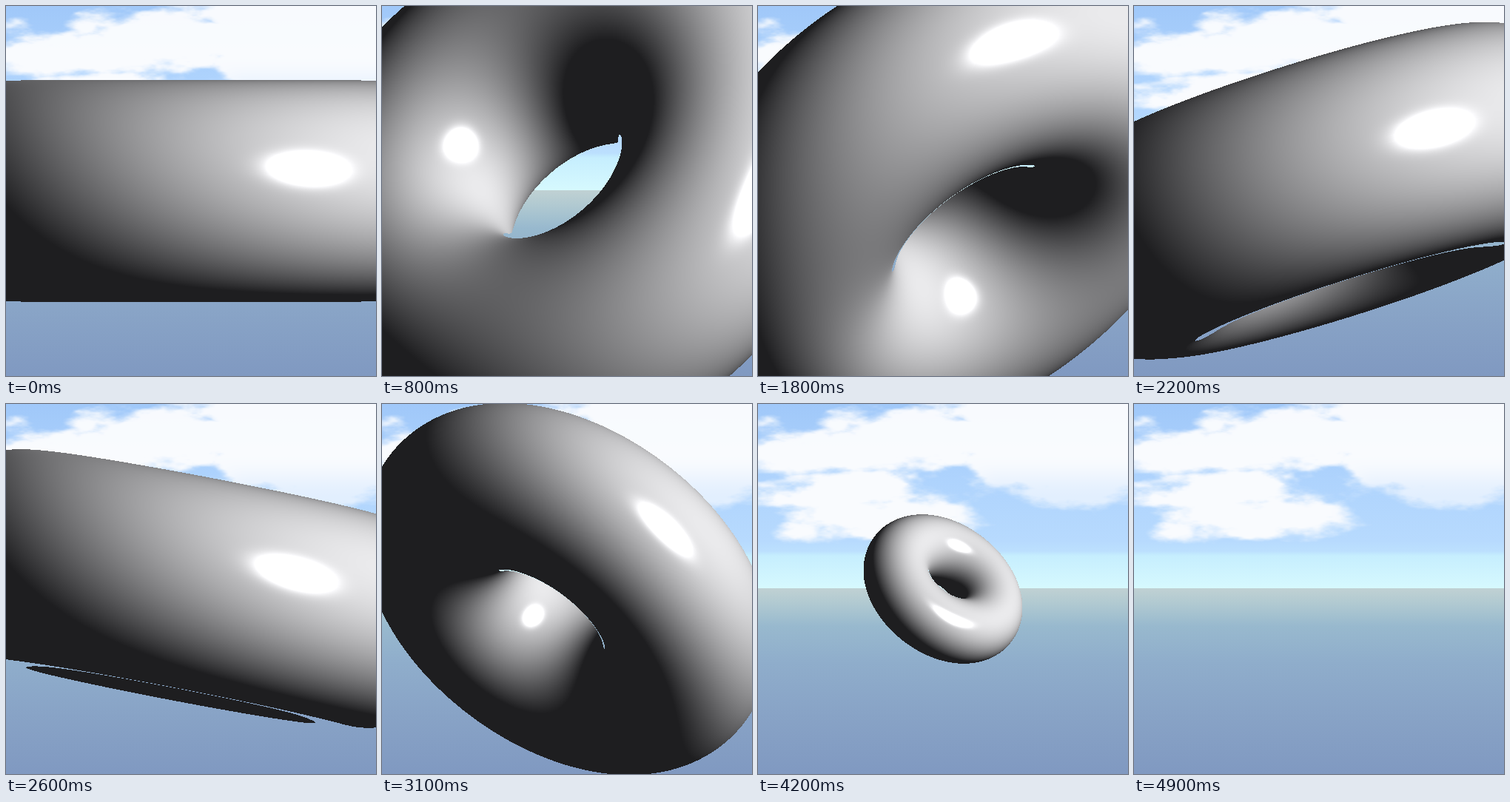
Write an HTML page with a canvas that moves like this. It is 500x500 px and loops after 5000 ms.

```html
<!DOCTYPE html>
<html lang="en">
<head>
<meta charset="utf-8">
<title>Tumbling torus</title>
<style>
  html, body { margin: 0; width: 100%; height: 100%; overflow: hidden; background: #8aa5c6; }
  canvas { display: block; width: 100vw; height: 100vh; }
</style>
</head>
<body>
<canvas id="stage" width="500" height="500"></canvas>
<script>
const SIZE = 500, MID = 250, STEPS = 50, STEP_MS = 100;
const ctx = document.getElementById('stage').getContext('2d', { willReadFrequently: true });
const LIGHT = [0.7, 0.36, 0.62];

// centre x, centre y, half width, half height of each cloud
const CLOUDS = [
  [95, 68, 185, 35], [230, 52, 125, 42], [130, 112, 125, 34],
  [155, 150, 115, 30], [62, 172, 42, 14], [430, 55, 185, 78],
  [380, 8, 130, 45], [335, 105, 60, 22], [125, 24, 80, 7]
];

const clamp01 = v => Math.min(1, Math.max(0, v));
const smooth = (a, b, v) => { const k = clamp01((v - a) / (b - a)); return k * k * (3 - 2 * k); };

function hash(x, y) {
  const v = Math.sin(x * 127.1 + y * 311.7) * 43758.5453;
  return v - Math.floor(v);
}

function noise(x, y) {
  const ix = Math.floor(x), iy = Math.floor(y);
  const u = smooth(0, 1, x - ix), v = smooth(0, 1, y - iy);
  const top = hash(ix, iy) * (1 - u) + hash(ix + 1, iy) * u;
  const low = hash(ix, iy + 1) * (1 - u) + hash(ix + 1, iy + 1) * u;
  return top * (1 - v) + low * v;
}

function fbm(x, y) {
  let sum = 0, amp = 0.5;
  for (let o = 0; o < 5; o++) {
    sum += amp * noise(x, y);
    x = x * 2 + 7.3; y = y * 2 + 3.1; amp /= 2;
  }
  return sum;
}

const inside = (x, y, [cx, cy, a, b]) => (1 - Math.hypot((x - cx) / a, (y - cy) / b)) * b / 28;

function gradient(y0, y1, stops) {
  const g = ctx.createLinearGradient(0, y0, 0, y1);
  for (const [y, color] of stops) g.addColorStop((y - y0) / (y1 - y0), color);
  ctx.fillStyle = g;
  ctx.fillRect(0, y0, SIZE, y1 - y0);
}

function makeBackdrop() {
  gradient(0, 249, [
    [0, 'rgb(160,200,249)'], [100, 'rgb(174,211,253)'], [185, 'rgb(183,218,254)'],
    [199, 'rgb(188,224,254)'], [205, 'rgb(198,238,254)'], [249, 'rgb(214,249,254)']
  ]);
  gradient(249, SIZE, [
    [249, 'rgb(192,209,211)'], [270, 'rgb(176,201,209)'], [300, 'rgb(152,185,206)'],
    [350, 'rgb(143,173,203)'], [420, 'rgb(136,163,198)'], [500, 'rgb(128,153,193)']
  ]);
  const img = ctx.getImageData(0, 0, SIZE, SIZE), px = img.data;
  for (let y = 0; y < 205; y++) {
    for (let x = 0; x < SIZE; x++) {
      let body = -2;
      for (const c of CLOUDS) body = Math.max(body, inside(x, y, c));
      body -= 1.3 * Math.max(0, inside(x, y, [270, 89, 34, 14]));
      const puff = fbm(x / 55, y / 22) - 0.48;
      const veil = 1 - 0.32 * smooth(70, 130, y) * smooth(260, 330, x);
      const alpha = smooth(-0.2, 0.45, body + puff * 1.7) * veil * 0.97;
      const i = (y * SIZE + x) * 4;
      px[i] += (251 - px[i]) * alpha;
      px[i + 1] += (252 - px[i + 1]) * alpha;
      px[i + 2] += (254 - px[i + 2]) * alpha;
    }
  }
  return img;
}

// Orthographic ray march of a torus with axis (ax, ay, az)
function drawTorus(px, scale, angle) {
  const R = 250 * scale, r = 150 * scale, far = R + r;
  const s = Math.sin(angle), c = Math.cos(angle);
  const ax = -s * c, ay = c, az = s * s;
  const [lx, ly, lz] = LIGHT;
  const from = Math.max(0, Math.floor(MID - far)), to = Math.min(SIZE, Math.ceil(MID + far));

  for (let row = from; row < to; row++) {
    const y = MID - row - 0.5;
    for (let col = from; col < to; col++) {
      const x = col + 0.5 - MID, flat = x * x + y * y;
      if (flat >= far * far) continue;
      const end = -Math.sqrt(far * far - flat), side = ax * x + ay * y;
      let z = -end, h = 0, q = 1, hit = false;
      for (let k = 0; k < 80 && z > end; k++) {
        h = side + az * z;
        q = Math.sqrt(Math.max(1e-9, flat + z * z - h * h));
        const d = Math.sqrt((q - R) * (q - R) + h * h) - r;
        if (d < 0.05) { hit = true; break; }
        z -= d;
      }
      if (!hit) continue;

      const k = R / q;
      const nx = (x - k * (x - h * ax)) / r;
      const ny = (y - k * (y - h * ay)) / r;
      const nz = (z - k * (z - h * az)) / r;
      const diffuse = nx * lx + ny * ly + nz * lz;
      let v = 30;
      if (diffuse > 0) {
        const shine = 2 * nz * diffuse - lz;
        v += 204 * diffuse + (shine > 0 ? 255 * Math.pow(shine, 40) : 0);
      }
      const i = (row * SIZE + col) * 4;
      px[i] = px[i + 1] = v;
      px[i + 2] = v + 2;
    }
  }
}

const backdrop = makeBackdrop();
const cache = [];

function picture(step) {
  if (!cache[step]) {
    const img = new ImageData(new Uint8ClampedArray(backdrop.data), SIZE, SIZE);
    const last = STEPS - 1;
    const scale = Math.min(1, (last - step) / 24);
    if (scale > 0) drawTorus(img.data, scale, 2 * Math.PI * step / last);
    cache[step] = img;
  }
  return cache[step];
}

const start = performance.now();
let shown = -1;

function tick() {
  const step = Math.floor((performance.now() - start) / STEP_MS) % STEPS;
  if (step !== shown) {
    ctx.putImageData(picture(step), 0, 0);
    shown = step;
  }
  requestAnimationFrame(tick);
}
tick();
</script>
</body>
</html>
```
